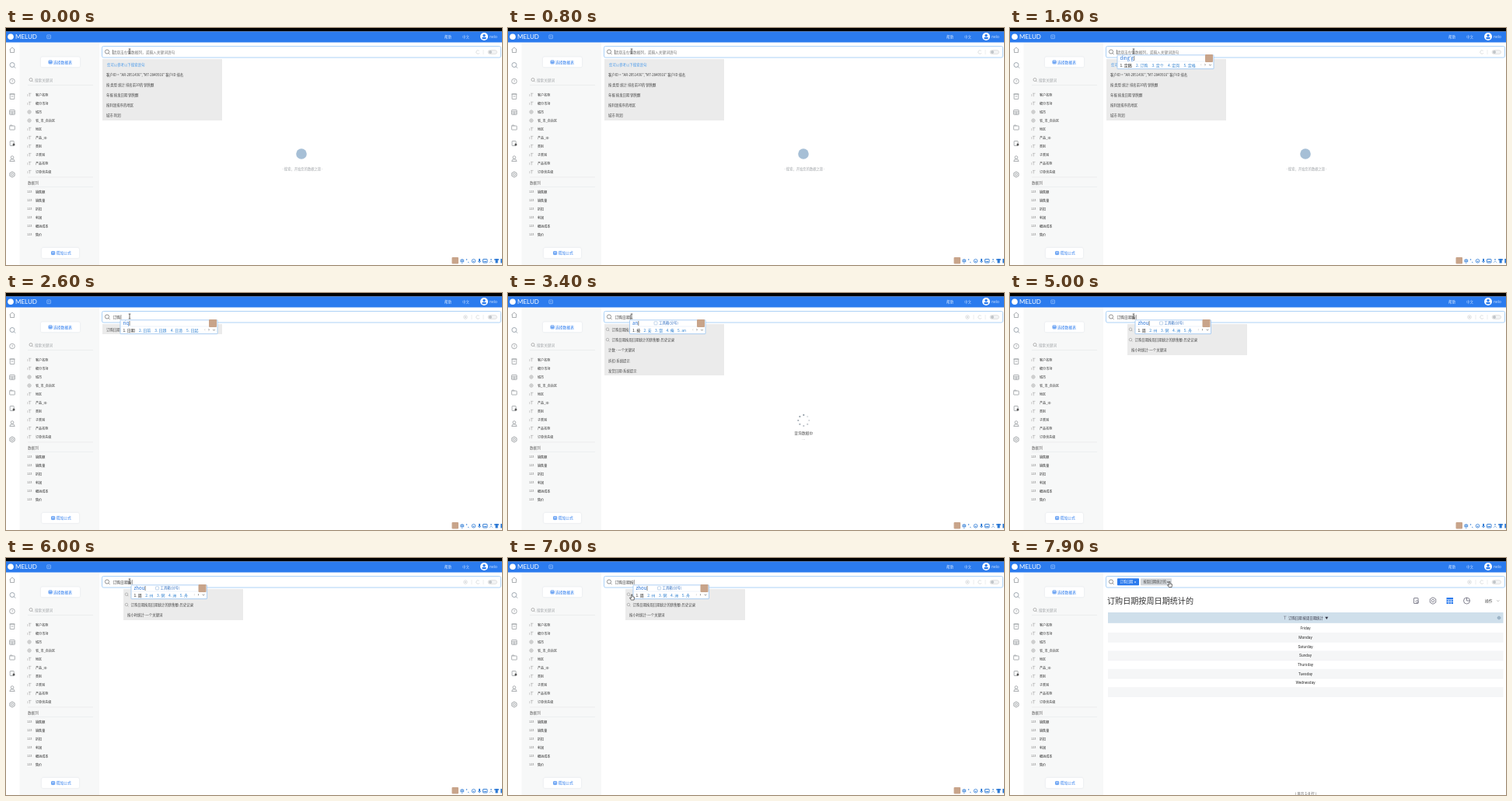
An HTML page with a canvas that plays this animation: 638 px wide and 305 px high, repeating every 8 s.

```html
<!DOCTYPE html>
<html lang="zh">
<head>
<meta charset="utf-8">
<style>
html, body { margin: 0; width: 100%; height: 100%; overflow: hidden; background: #fff; }
canvas { display: block; width: 638px; height: 305px; }
</style>
</head>
<body>
<canvas id="stage"></canvas>
<script>
const W = 638, H = 305, LOOP = 8000;
const BLUE = '#2b7bee', INK = '#444', GREY = '#8b9094';
const CJK = '"Noto Sans CJK SC", "Noto Sans CJK", "Noto Sans", sans-serif';
const canvas = document.getElementById('stage');
const c = canvas.getContext('2d');
const dpr = window.devicePixelRatio || 1;
canvas.width = W * dpr;
canvas.height = H * dpr;

function text(s, x, y, size = 4.5, color = INK, align = 'left', font = CJK, weight = 400) {
  c.font = `${weight} ${size}px ${font}`;
  c.fillStyle = color;
  c.textAlign = align;
  c.textBaseline = 'middle';
  c.fillText(s, x, y);
  return c.measureText(s).width;
}
function rect(x, y, w, h, fill) {
  c.fillStyle = fill;
  c.fillRect(x, y, w, h);
}
function box(x, y, w, h, r, fill, stroke, lw = 0.7) {
  c.beginPath();
  c.roundRect(x, y, w, h, r);
  if (fill) { c.fillStyle = fill; c.fill(); }
  if (stroke) { c.strokeStyle = stroke; c.lineWidth = lw; c.stroke(); }
}
function line(color, lw, ...p) {
  c.beginPath();
  c.moveTo(p[0], p[1]);
  for (let i = 2; i < p.length; i += 2) c.lineTo(p[i], p[i + 1]);
  c.strokeStyle = color;
  c.lineWidth = lw;
  c.stroke();
}
function ring(x, y, r, color, lw = 0.7, from = 0, to = Math.PI * 2) {
  c.beginPath();
  c.arc(x, y, r, from, to);
  c.strokeStyle = color;
  c.lineWidth = lw;
  c.stroke();
}
function disc(x, y, r, color) {
  c.beginPath();
  c.arc(x, y, r, 0, Math.PI * 2);
  c.fillStyle = color;
  c.fill();
}
function lens(x, y, r, color, lw = 0.7) {
  ring(x, y, r, color, lw);
  line(color, lw, x + r * 0.7, y + r * 0.7, x + r * 1.4, y + r * 1.4);
}
function grid(x, y, w, h, color) {
  box(x, y, w, h, 0.5, null, color);
  line(color, 0.6, x, y + h / 3, x + w, y + h / 3);
  line(color, 0.6, x, y + h * 2 / 3, x + w, y + h * 2 / 3);
  line(color, 0.6, x + w / 2, y + h / 3, x + w / 2, y + h);
}
function gear(x, y, r, color) {
  c.beginPath();
  for (let i = 0; i <= 6; i++) {
    const a = i * Math.PI / 3 + Math.PI / 6;
    c.lineTo(x + r * Math.cos(a), y + r * Math.sin(a));
  }
  c.strokeStyle = color;
  c.lineWidth = 0.8;
  c.stroke();
  ring(x, y, r * 0.4, color);
}

function header() {
  rect(0, 0, W, 4.5, '#000');
  rect(0, 4.5, W, 14, BLUE);
  disc(6, 11.3, 3.8, '#fff');
  text('MELUD', 12, 11.8, 8, '#fff', 'left', 'Lato, sans-serif');
  box(52.8, 9, 4.6, 4.6, 0.5, null, '#b8d5ff', 0.6);
  line('#b8d5ff', 0.6, 54, 11.3, 56.2, 11.3);
  text('帮助', 564, 11.5, 4.4, '#e6f0ff');
  text('中文', 587, 11.5, 4.4, '#b9d5ff');
  disc(615, 11, 5, '#fff');
  disc(615, 9.6, 1.7, BLUE);
  box(612.3, 11.8, 5.4, 2.4, 1.2, BLUE);
  text('nelo', 622, 11.3, 4.8, '#dbe9ff');
}

function rail() {
  const x = 8, k = GREY;
  line(k, 0.7, x - 3.5, 28, x, 25, x + 3.5, 28);
  line(k, 0.7, x - 2.5, 27.5, x - 2.5, 31.5, x + 2.5, 31.5, x + 2.5, 27.5);
  lens(x, 47.5, 3, '#7c8994');
  ring(x, 68.5, 3.3, k);
  text('?', x, 68.6, 5, k, 'center');
  line(k, 0.7, x - 3.5, 85, x + 3.5, 85);
  box(x - 2.8, 85, 5.6, 6.5, 0.3, null, k);
  line(k, 0.7, x - 1.3, 88, x + 1.3, 88);
  grid(x - 3.3, 105.5, 6.6, 6, k);
  box(x - 3.3, 126, 6.6, 5, 0.5, null, k);
  line(k, 0.7, x - 3.3, 126, x - 2.5, 125, x - 0.5, 125, x + 0.3, 126);
  box(x - 2.8, 145.5, 5, 6, 0.5, null, k);
  disc(x + 2, 150, 1.5, '#555');
  ring(x, 166.5, 1.8, k);
  line(k, 0.7, x - 3.2, 171.5, x - 2, 169, x + 2, 169, x + 3.2, 171.5, x - 3.2, 171.5);
  gear(x, 188.5, 3.6, k);
}

const FIELDS = ['客户名称', '细分市场', '城市', '省_市_自治区', '地区', '产品_ID', '类别', '子类别', '产品名称', '订单优先级'];
const MEASURES = ['销售额', '销售量', '折扣', '利润', '细运成本', '售价'];

function button(x, y, w, label, lx) {
  c.save();
  c.shadowColor = 'rgba(60,90,130,.16)';
  c.shadowBlur = 2 * dpr;
  box(x, y, w, 13, 1.5, '#fff');
  c.restore();
  text(label, lx, y + 6.6, 4.8, BLUE);
  grid(lx - 6, y + 4.6, 4.2, 4, BLUE);
}

function sidebar() {
  rect(17.5, 18.5, 102.5, H, '#f7f8f8');
  rail();
  button(45, 37.3, 50, '选择数据表', 61);
  lens(32, 66.5, 2, '#888', 0.6);
  text('搜索关键词', 37, 67, 4.6, '#a3a7aa');
  line('#e4e6e8', 0.6, 28, 73.5, 112, 73.5);
  FIELDS.forEach((f, i) => {
    const y = 86 + i * 11.02;
    if (i === 2 || i === 3) {
      ring(30, y, 2.2, '#999', 0.5);
      line('#999', 0.5, 27.8, y, 32.2, y);
      line('#999', 0.5, 30, y - 2.2, 30, y + 2.2);
    } else {
      line('#999', 0.5, 29, y - 1.8, 32.5, y - 1.8);
      line('#999', 0.5, 30.5, y - 1.8, 30.5, y + 2.2);
      line('#999', 0.5, 28, y - 1, 28, y + 2);
    }
    text(f, 38, y, 4.1, '#333');
  });
  line('#e2e4e6', 0.6, 28, 192, 112, 192);
  text('数据列', 28, 198.8, 4.6, '#666');
  line('#e8eaec', 0.6, 28, 204.5, 112, 204.5);
  MEASURES.forEach((m, i) => {
    const y = 211 + i * 11;
    text('123', 27, y, 3.9, '#777');
    text(m, 38, y, 4.1, '#222', 'left', CJK, 500);
  });
  button(46, 283, 48, '增加公式', 64.5);
}

function searchBar(filled) {
  box(123.5, 23.5, 513, 14.5, 2, '#fff', '#a3cdf7', 0.9);
  lens(130, 30.5, 2.6, '#666');
  const k = '#c6cacd';
  if (filled) {
    ring(591, 31, 2.3, k, 0.6);
    line(k, 0.6, 590, 30, 592, 32);
    line(k, 0.6, 592, 30, 590, 32);
    line('#e0e2e4', 0.6, 599, 28, 599, 34);
  }
  ring(607, 31, 2.2, k, 0.6, 0.5, 5.6);
  line('#e0e2e4', 0.6, 614, 28, 614, 34);
  box(620, 28.5, 11.5, 5, 2.5, '#f2f3f4', '#ccc', 0.5);
  disc(623, 31, 2, '#c0c4c8');
}

const HINTS = ['客户ID = "AR-2051436","MT-2840916" 客户ID 排名', '按 类型 统计 排名前10的 销售额', '年报 按发日期 销售额', '按利润排序的地区', '城市 利润'];
const HISTORY = '订购日期按周日期统计的销售额-历史记录';

// Rows starting with "?" carry a search icon.
function dropdown(x, h, rows) {
  rect(x, 40, 154, h, '#ebebeb');
  rows.forEach((r, i) => {
    const y = 47 + i * 13.3, icon = r[0] === '?';
    if (icon) lens(x + 4, y - 0.3, 1.8, '#888', 0.5);
    text(icon ? r.slice(1) : r, x + (icon ? 9.5 : 5), y, 4.4);
  });
}
function hints() {
  rect(124, 40, 154, 79, '#ebebeb');
  text('您可以参考以下搜索语句:', 130, 47, 4.4, '#4c9bea');
  HINTS.forEach((s, i) => text(s, 129, 60.3 + i * 13, 4.4));
}

function mascot(x, y, s) {
  box(x, y, s, s, 1, '#c8a48a');
}

function ime(x, w, typed, words, step, tool) {
  box(x, 34.8, w, 17.8, 0.5, '#fff', '#8fbdf0', 0.7);
  const tw = text(typed, x + 3.5, 39, 6, '#1f6fd8', 'left', CJK, 500);
  line('#333', 0.6, x + 4.3 + tw, 36, x + 4.3 + tw, 42);
  line('#d8e6f6', 0.5, x + 1, 43, x + w - 1, 43);
  if (tool) {
    box(x + 31.5, 36.8, 4, 4, 0.5, null, '#8aaed8', 0.5);
    text('工具箱(分号)', x + 37.5, 38.8, 4.4, '#2c6cc0');
  }
  words.forEach((s, i) =>
    text(`${i + 1}. ${s}`, x + 3.5 + i * step, 47.6, 5, i ? '#2c7fd0' : '#222'));
  text('‹', x + w - 16, 47.2, 6, '#bbb', 'center');
  text('›', x + w - 11, 47.2, 6, '#333', 'center');
  line('#555', 0.6, x + w - 6, 46.8, x + w - 4.5, 48.2, x + w - 3, 46.8);
  mascot(x + w - 11, 34, 10);
}

function tray() {
  mascot(573.5, 295, 8.5);
  const k = '#2a78d4';
  text('中', 584, 299.8, 5.6, k, 'left', CJK, 700);
  disc(592.5, 298, 0.8, k);
  line(k, 0.8, 594, 301, 595.5, 302);
  ring(601.5, 299.8, 2.3, k, 0.8);
  disc(601.5, 300.3, 0.8, k);
  box(608, 296.8, 2, 4, 1, k);
  line(k, 0.7, 607, 300, 609, 302, 611, 300);
  box(613.5, 297.5, 5.5, 4.5, 0.5, null, k, 0.9);
  line(k, 0.8, 614.5, 300.5, 618, 300.5);
  disc(624, 298, 1.1, '#78a9df');
  line('#78a9df', 0.8, 621.8, 302, 624, 300, 626.2, 302);
  box(629.5, 297, 3.2, 5.5, 0.5, k);
  line(k, 1.4, 628, 298, 634, 298);
  rect(636.3, 297, 1.7, 5.5, k);
}

function welcome() {
  disc(380, 162, 6.8, '#a6bfd6');
  text('- 搜索，开始您的数据之旅 -', 381.5, 181, 4.3, '#a2a6aa', 'center');
}
function loader(t) {
  const lead = t / 110;
  for (let i = 0; i < 8; i++) {
    const a = i * Math.PI / 4, age = ((lead - i) % 8 + 8) % 8;
    c.globalAlpha = 1 - age * 0.09;
    disc(380.3 + 7 * Math.cos(a), 164 + 7 * Math.sin(a), 1.1, '#7f8b96');
  }
  c.globalAlpha = 1;
  text('查询数据中', 380.3, 180, 4.8, '#555', 'center');
  text('...', 380.3, 187, 4.8, '#888', 'center');
}

function chip(x, w, label, fill, color) {
  box(x, 26.3, w, 9, 0.8, fill);
  text(label, x + 3.5, 30.9, 4.2, color);
  const k = x + w - 5;
  line(color, 0.5, k - 1, 30, k + 1, 32);
  line(color, 0.5, k + 1, 30, k - 1, 32);
}
function chips() {
  chip(138, 28, '订购日期', BLUE, '#fff');
  chip(168, 40, '按周日期统计的', '#d3d7db', '#444');
}

const DAYS = ['Friday', 'Monday', 'Saturday', 'Sunday', 'Thursday', 'Tuesday', 'Wednesday'];

function results() {
  text('订购日期按周日期统计的', 125, 55, 10.1, '#333');
  box(519.5, 51.5, 5.5, 7, 0.5, null, '#667', 0.8);
  lens(523.5, 56, 1.5, '#667', 0.6);
  gear(544, 55, 4.3, '#667');
  rect(561.5, 51, 8.5, 8, BLUE);
  line('#fff', 0.7, 561.5, 53.7, 570, 53.7);
  line('#fff', 0.7, 561.5, 56.4, 570, 56.4);
  line('#fff', 0.7, 564.3, 53.7, 564.3, 59);
  line('#fff', 0.7, 567.2, 53.7, 567.2, 59);
  ring(587.5, 55, 4, '#667', 0.8);
  line('#667', 0.8, 587.5, 51, 587.5, 55, 591.5, 55);
  text('操作', 611, 55.2, 4.7, '#444');
  line('#888', 0.6, 626.3, 54.4, 627.8, 55.9, 629.3, 54.4);

  rect(126, 70, 508.5, 13.8, '#cfdfeb');
  line('#667', 0.5, 352, 75, 355.5, 75);
  line('#667', 0.5, 353.5, 75, 353.5, 79.2);
  text('订购日期 按周日期统计', 358, 77, 4.4, '#334');
  c.beginPath();
  c.moveTo(405.3, 75.8);
  c.lineTo(409.3, 75.8);
  c.lineTo(407.3, 79);
  c.fillStyle = '#334';
  c.fill();
  gear(629, 77, 2, '#7f9bb2');
  for (let i = 0; i < 8; i++) {
    const y = 84.8 + i * 11.7;
    if (i % 2) rect(126, y, 508.5, 11.7, '#f5f6f7');
    line('#ebedee', 0.5, 126, y + 11.7, 634.5, y + 11.7);
    if (DAYS[i]) text(DAYS[i], 380, y + 6, 4.9, '#333', 'center', 'Roboto, sans-serif');
  }
  text('( 显示 1-8 行 )', 380.5, 303, 4.6, '#555', 'center');
}

function beam(x, y) {
  line('#333', 0.7, x, y - 3, x, y + 3);
  line('#333', 0.7, x - 1.3, y - 3, x + 1.3, y - 3);
  line('#333', 0.7, x - 1.3, y + 3, x + 1.3, y + 3);
}
function hand(x, y) {
  c.beginPath();
  c.moveTo(x - 0.8, y - 3.5);
  c.lineTo(x + 0.4, y - 3.5);
  c.lineTo(x + 0.6, y - 0.8);
  c.lineTo(x + 3, y - 0.2);
  c.lineTo(x + 2.6, y + 3.5);
  c.lineTo(x - 1.2, y + 3.5);
  c.lineTo(x - 3, y + 0.6);
  c.lineTo(x - 0.8, y + 1);
  c.closePath();
  c.fillStyle = '#fff';
  c.fill();
  c.strokeStyle = '#333';
  c.lineWidth = 0.7;
  c.stroke();
}

// Latest value whose start time has passed.
function at(t, steps) {
  let v = '';
  for (const [start, value] of steps) if (t >= start) v = value;
  return v;
}
function glide(t, from, to, a, b) {
  const k = Math.min(1, Math.max(0, (t - from) / (to - from)));
  return a + (b - a) * k * k * (3 - 2 * k);
}

const QUERY = [[1900, '订购'], [2800, '订购日期'], [3700, '订购日期按']];
const KEYS = [
  [1000, 'd'], [1100, 'di'], [1200, 'din'], [1300, 'ding'], [1500, "ding'g"], [1700, "ding'go"], [1800, "ding'gou"], [1900, ''],
  [2300, 'r'], [2400, 'ri'], [2500, 'riq'], [2700, 'riqi'], [2800, ''],
  [3300, 'a'], [3400, 'an'], [3700, ''],
  [4600, 'z'], [4700, 'zh'], [4800, 'zho'], [4900, 'zhou'], [7300, '']
];

function draw(t) {
  c.setTransform(dpr, 0, 0, dpr, 0, 0);
  rect(0, 0, W, H, '#fff');
  sidebar();
  header();

  const query = at(t, QUERY), keys = at(t, KEYS), done = t >= 7400;
  searchBar(query !== '');
  if (done) chips();
  else if (query) {
    const w = text(query, 137.5, 30.8, 4.8, '#333');
    line('#333', 0.5, 138.3 + w, 28, 138.3 + w, 34);
  } else {
    text('请双击左侧数据列，或输入关键词语句', 137.5, 30.8, 4.7, '#777');
    line('#333', 0.6, 137.3, 28, 137.3, 34);
  }

  if (t < 2000) { welcome(); hints(); }
  else if (t < 2900) dropdown(124, 13, ['订购日期']);
  else if (t < 3800) {
    dropdown(124, 66, ['?订购日期按周日期统计的', '?' + HISTORY, '计数 - 一个关键词', '折扣-系统提示', '发货日期-系统提示']);
    loader(t);
  } else if (!done) dropdown(151, 40, ['?订购日期按周日期统计的', '?' + HISTORY, '按小时统计-一个关键词']);
  else if (t < 7600) loader(t);
  else results();

  if (keys) {
    if (t < 1900) ime(138, 124, keys, ['定稿', '订购', '定个', '定岗', '定格'], 20.5);
    else if (t < 2800) ime(147, 125, keys, ['日期', '日前', '日趋', '日清', '日起'], 20.4);
    else if (t < 3700) ime(156.5, 97.5, keys, ['按', '安', '案', '俺', 'an'], 14.5, true);
    else ime(161, 97.5, keys, ['周', '州', '粥', '洲', '舟'], 14.8, true);
  }
  if (t < 7600) tray();

  if (t < 6400) beam(159, 30);
  else hand(glide(t, 7200, 7600, 159.5, 205.5), t < 7200 ? glide(t, 6400, 6800, 36, 50.5) : glide(t, 7200, 7600, 50.5, 34));
}

const begin = performance.now();
function tick() {
  draw((performance.now() - begin) % LOOP);
  requestAnimationFrame(tick);
}
tick();
</script>
</body>
</html>
```
